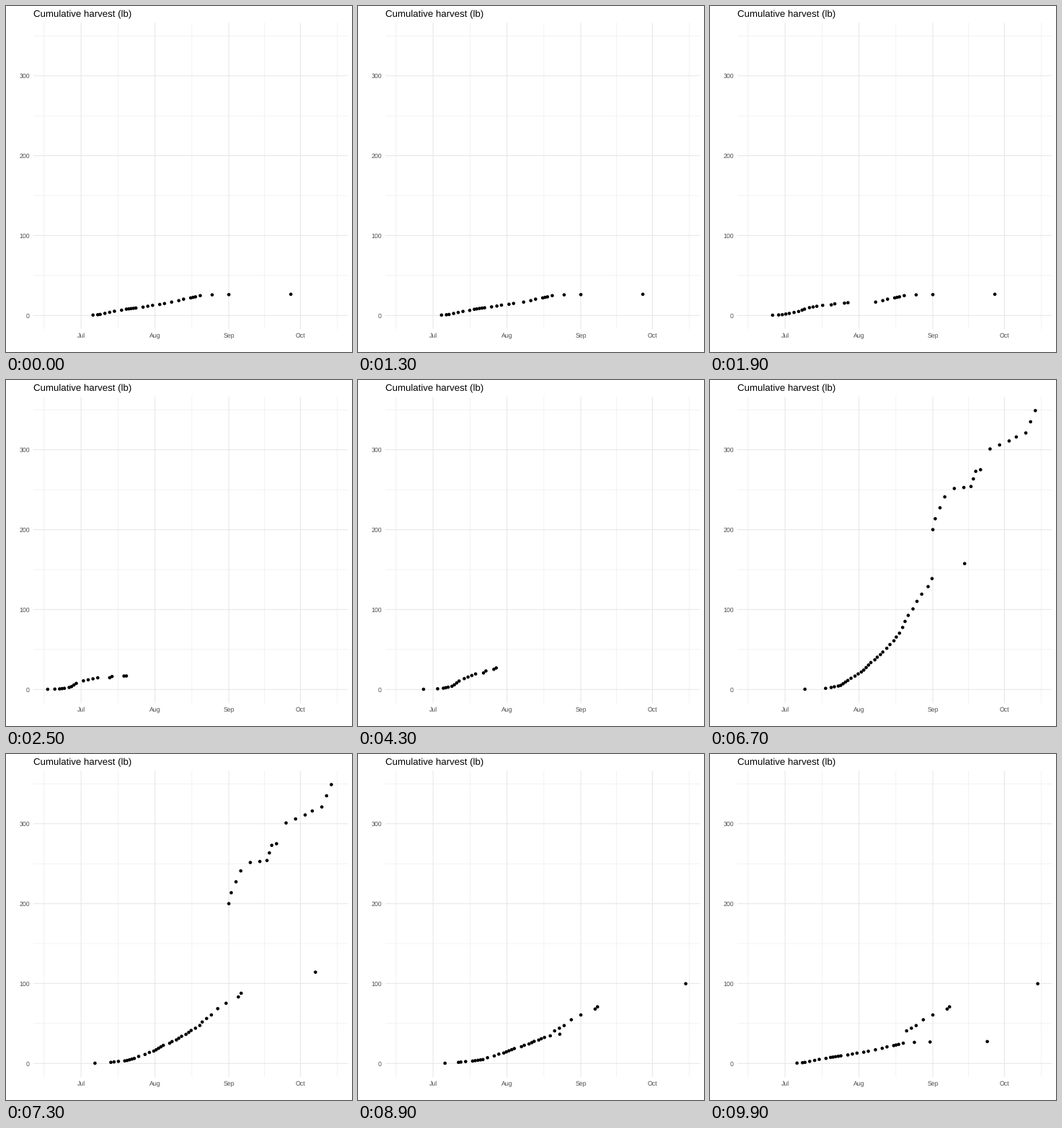
These frames come from a looping animation (480x480 px, 10 s). A matplotlib script:

```python
import matplotlib.pyplot as plt
import numpy as np
from matplotlib.animation import FuncAnimation

plt.rcParams["font.family"] = "Liberation Sans"
plt.rcParams["text.hinting"] = "none"

SIZE = 480
CYCLE = 25          # frames from one season to the next
LEFT, RIGHT, TOP, BOTTOM = 38, 474.5, 23.3, 448.2
GRID = "#E7E7E7"


def day_x(day):
    """Days after July 1 to pixels."""
    return 104.14 + 3.3068 * np.asarray(day, float)


def pound_y(lb):
    return 429.3 - 1.1085 * np.asarray(lb, float)


def season(*knots):
    """Picks along straight runs between knots (pick number, day, pounds)."""
    nums, days, pounds = zip(*knots)
    picks = np.arange(nums[-1] + 1)
    day = np.floor(np.interp(picks, nums, days) + 0.5)
    return np.column_stack([day_x(day),
                            pound_y(np.interp(picks, nums, pounds))])


seasons = [
    season((0, 5.2, 0.5), (2, 7.8, 1.3), (7, 18.8, 7.9), (11, 23.4, 9.3),
           (16, 35.2, 14.9), (19, 43.4, 20.4), (20, 46, 22), (22, 48, 23.3),
           (23, 50, 24.8), (24, 55, 25.8), (25, 62, 26.1), (26, 88, 26.5)),
    season((0, -14, 0.2), (2, -9, 0.7), (4, -6.6, 1.4), (6, -4.3, 3.6),
           (8, -2, 7.6), (9, 1, 10.8), (12, 7, 14.6), (13, 12, 14.7),
           (14, 13, 16.2), (15, 18, 16.8), (16, 19, 16.9)),
    season((0, 10, 0.3), (1, 20, 1.4), (2, 23, 2.8), (5, 26, 6),
           (13, 34, 29), (20, 41.4, 57), (25, 48.4, 88), (28, 51.4, 117),
           (32, 56, 159), (38, 67, 241), (39, 71, 251.5), (41, 78, 254),
           (43, 80, 273), (44, 82, 275), (45, 86, 301), (49, 101, 321),
           (51, 105, 349)),
    season((0, 5, 0.3), (1, 11, 1.4), (2, 12, 1.8), (4, 16.8, 2.9),
           (8, 20.9, 4.6), (11, 28.4, 11.9), (16, 34, 19), (17, 36.8, 21.4),
           (24, 46.4, 33.2), (26, 49.6, 37.5), (29, 55, 47.4),
           (30, 58, 54.7), (31, 62, 60.7), (32, 68, 68.1), (33, 69, 70.9),
           (34, 106, 99.8)),
]

fig = plt.figure(figsize=(SIZE / 72, SIZE / 72), dpi=72, facecolor="white")
ax = fig.add_axes([0, 0, 1, 1])
ax.set(xlim=(0, SIZE), ylim=(SIZE, 0))
ax.axis("off")


def grid(days, pounds, width):
    style = dict(color=GRID, lw=width, snap=False, solid_capstyle="butt",
                 zorder=width)
    for y in pound_y(pounds):
        ax.plot([LEFT, RIGHT], [y, y], **style)
    for x in day_x(days):
        ax.plot([x, x], [TOP, BOTTOM], **style)


months = {"Jul": 0, "Aug": 31, "Sep": 62, "Oct": 92}
ticks = range(0, 400, 100)
grid([-15.5, 15.5, 46.5, 77, 107.5], range(50, 400, 100), 0.53)
grid(list(months.values()), ticks, 1.07)

label = dict(fontsize=8.8, color="#4D4D4D", va="baseline")
for name, day in months.items():
    ax.text(day_x(day), 460, name, ha="center", **label)
for lb in ticks:
    ax.text(33, pound_y(lb) + 3.15, str(lb), ha="right", **label)
ax.text(LEFT, 15, "Cumulative harvest (lb)", fontsize=13.2, color="black",
        va="baseline")

dots = ax.scatter([], [], color="black", linewidths=0, zorder=3)
dots.set_snap(False)


def positions(frame):
    k, step = divmod(frame, CYCLE)
    hold = 12 if k == 0 else 13
    moved = max(0, step - hold)
    here, there = seasons[k], seasons[(k + 1) % len(seasons)]
    n = min(len(here), len(there))
    t = moved / (CYCLE - hold)
    pts = here[:n] + (there[:n] - here[:n]) * t
    # surplus dots wait in place, then vanish
    return np.vstack([pts, here[n:]]) if moved < 12 else pts


def draw(frame):
    pts = positions(frame)
    dots.set_offsets(pts)
    dots.set_sizes(np.full(len(pts), 4.6 ** 2))
    return (dots,)


anim = FuncAnimation(fig, draw, frames=4 * CYCLE, interval=100, repeat=True,
                     repeat_delay=0)
plt.show()
```
